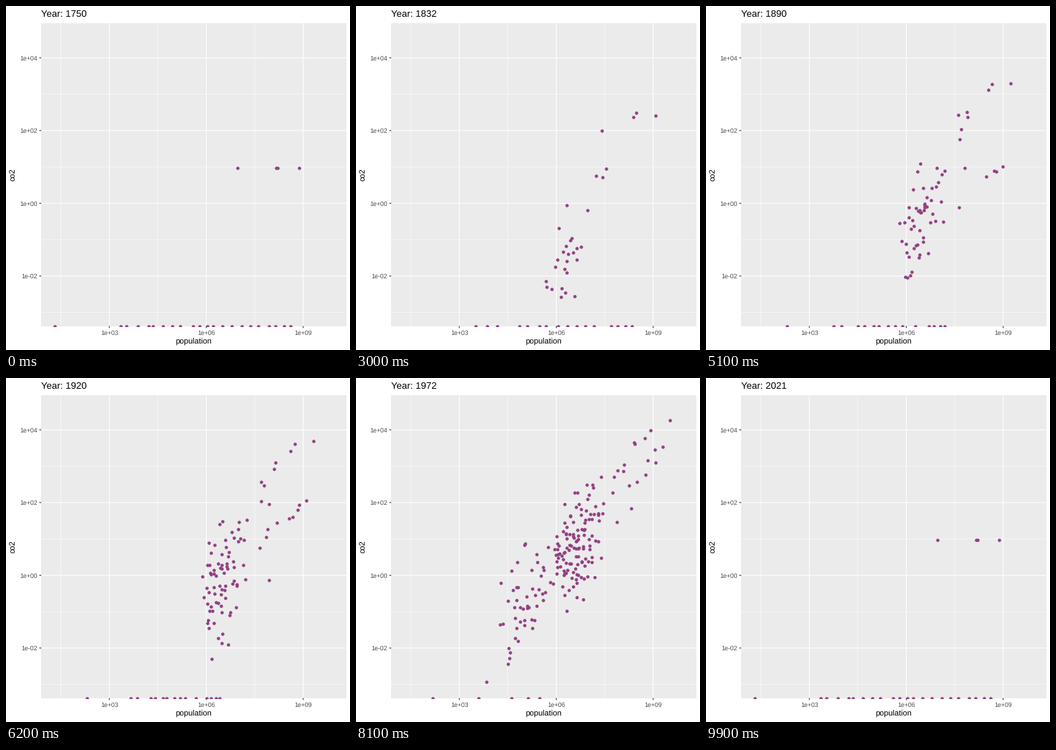
Animation of 480 by 480 pixels, one loop 10 s. Source, as a matplotlib script:

```python
import numpy as np
import matplotlib.pyplot as plt
from matplotlib.animation import FuncAnimation
from matplotlib.patches import Rectangle

plt.rcParams["font.family"] = "Liberation Sans"
plt.rcParams["text.hinting"] = "none"
SIZE, FRAMES = 480, 100
LEFT, RIGHT, TOP, BOTTOM = 49.2, 474.5, 24, 446.6
DOT = "#923f82"
KEYS = [0, 19, 40, 62, 75, 87, 98]
LAST = KEYS[-1]
rng = np.random.default_rng(5)

# Ease-out powers for population and emissions.
GROWING, STEADY, EARLY = (0.58, 1.4), (1.0, 1.8), (2.0, 2.4)
# First frame, start point, end point, easing.
LARGE = [
    (0, (409, 226), (455, 43), GROWING),
    (0, (378.5, 226), (418, 66), STEADY),
    (0, (377, 226), (409, 78), STEADY),
    (40, (410.5, 282), (444, 55), GROWING),
    (40, (401.5, 290), (431.5, 58), GROWING),
    (40, (398, 280), (437, 82), GROWING),
    (40, (387.5, 285), (420, 102), GROWING),
    (62, (400, 194), (421, 72), GROWING),
    (62, (377.5, 202), (419, 115), GROWING),
    (40, (356.5, 190), (402, 80), STEADY),
    (40, (343.5, 353), (396, 125), STEADY),
    (62, (367, 282), (400, 147), STEADY),
    (0, (323, 226), (361, 137), EARLY),
    (19, (315, 302.5), (391.5, 85), EARLY),
    (19, (336.5, 288), (366, 125), EARLY),
    (19, (345.5, 257.5), (359, 157), EARLY),
    (62, (364.5, 210.5), (377, 103), EARLY),
    (40, (354, 294.5), (375, 121), EARLY),
]


def px(log_pop):
    return 144.2 + 45.08 * (log_pop - 3)


def py(log_co2):
    return 275.3 - 50.75 * log_co2


def keyed(t, *values):
    return np.interp(t, KEYS, values)


def large_dots(t):
    out = []
    for born, start, end, power in LARGE:
        if t >= born:
            left = 1 - (t - born) / (LAST - born)
            ease = 1 - left ** np.array(power)
            out.append(start + np.subtract(end, start) * ease)
    return np.array(out)


# The cloud: size, year of entry and a lasting deviation from the trend.
def cohort(count, first, last, mean, spread, low, high):
    x = np.clip(rng.normal(mean, spread, count), low, high)
    return np.column_stack([x, rng.integers(first, last + 1, count)])


cloud = np.vstack([
    cohort(4, 12, 19, 318, 18, 285, 345),
    cohort(30, 20, 40, 307, 17, 277, 350),
    cohort(40, 41, 62, 311, 20, 265, 362),
    cohort(12, 63, 72, 300, 16, 275, 345),
    cohort(26, 73, 73, 306, 18, 272, 350),
    cohort(18, 63, 72, 238, 22, 185, 276),
    cohort(32, 73, 74, 236, 27, 159, 278),
    cohort(16, 76, 87, 255, 45, 172, 335),
])
base_x, born = cloud.T
deviation = np.clip(rng.normal(0, 1, len(cloud)), -1.8, 1.8)
jitter = rng.normal(0, 1, (len(KEYS), len(cloud)))


def cloud_dots(t):
    wobble = np.array([np.interp(t, KEYS, j) for j in jitter.T])
    x = base_x + keyed(t, -20, -15, -10, -4, 0, 7, 10) + wobble
    trend = keyed(t, 320, 302, 276, 258, 242, 222, 214)
    slope = keyed(t, -2, -2, -1.9, -1.3, -0.95, -1, -1)
    entry = np.where(born < 63, 45 * np.exp(-(t - born).clip(0) / 10), 0)
    y = trend + slope * (x - 310) + 40 * deviation + 8 * wobble + entry
    return np.column_stack([x, np.minimum(y, 428)])[born <= t]


# Zero emitters sit on the lower edge and leave it one by one.
rank = rng.permutation((np.arange(21) + rng.uniform(-0.4, 0.4, 21)) / 20)


def zero_dots(t):
    count = int(np.ceil(keyed(t, 21, 17, 14, 14, 5, 3, 0)))
    limit = keyed(t, 401, 407, 372, 300, 302, 232, 232)
    x = 160 + (limit - 160) * rank[:count]
    if t % 11 < 8:
        x = np.append(x, np.interp(t, [0, 12, 24], [68, 79, 99]) + 1.93 * (t % 11))
    return np.column_stack([x, np.full(len(x), BOTTOM)])


fig = plt.figure(figsize=(SIZE / 72, SIZE / 72), dpi=72, facecolor="white")
ax = fig.add_axes([0, 0, 1, 1])
ax.set(xlim=(0, SIZE), ylim=(SIZE, 0))
ax.axis("off")
panel = Rectangle((LEFT, TOP), RIGHT - LEFT, BOTTOM - TOP, fc="#ebebeb", lw=0, zorder=0)
ax.add_patch(panel)


def line(xs, ys, width, color="white"):
    ax.plot(xs, ys, color=color, lw=width, solid_capstyle="butt", snap=False, zorder=1)


def label(x, y, text, size, color="black", ha="center", va="baseline", **kw):
    return ax.text(x, y, text, fontsize=size, color=color, ha=ha, va=va, **kw)


for p in (1.5, 4.5, 7.5):
    line([px(p)] * 2, [TOP, BOTTOM], 0.53)
for p in (-3, -1, 1, 3):
    line([LEFT, RIGHT], [py(p)] * 2, 0.53)
for p in (3, 6, 9):
    line([px(p)] * 2, [TOP, BOTTOM], 1.07)
    line([px(p)] * 2, [BOTTOM, BOTTOM + 2.74], 1.07, "#333333")
    label(px(p), 459, f"1e+{p:02d}", 8.8, "#4d4d4d")
for p in (-2, 0, 2, 4):
    line([LEFT, RIGHT], [py(p)] * 2, 1.07)
    line([LEFT - 2.74, LEFT], [py(p)] * 2, 1.07, "#333333")
    label(44.2, py(p) + 3.2, f"1e{p:+03d}", 8.8, "#4d4d4d", ha="right")

label((LEFT + RIGHT) / 2, 472, "population", 11)
label(9.5, (TOP + BOTTOM) / 2, "co2", 11, va="center", rotation=90)
title = label(LEFT, 15, "", 13.2, ha="left")
dots = ax.scatter([], [], s=21, c=DOT, linewidths=0, zorder=3)
dots.set_clip_path(panel)


def draw(i):
    t = i % (FRAMES - 1)
    dots.set_offsets(np.vstack([large_dots(t), cloud_dots(t), zero_dots(t)]))
    title.set_text(f"Year: {round(1750 + 271 * i / (FRAMES - 1))}")
    return dots, title


anim = FuncAnimation(fig, draw, frames=FRAMES, interval=100, repeat=True, repeat_delay=0)
plt.show()
```
